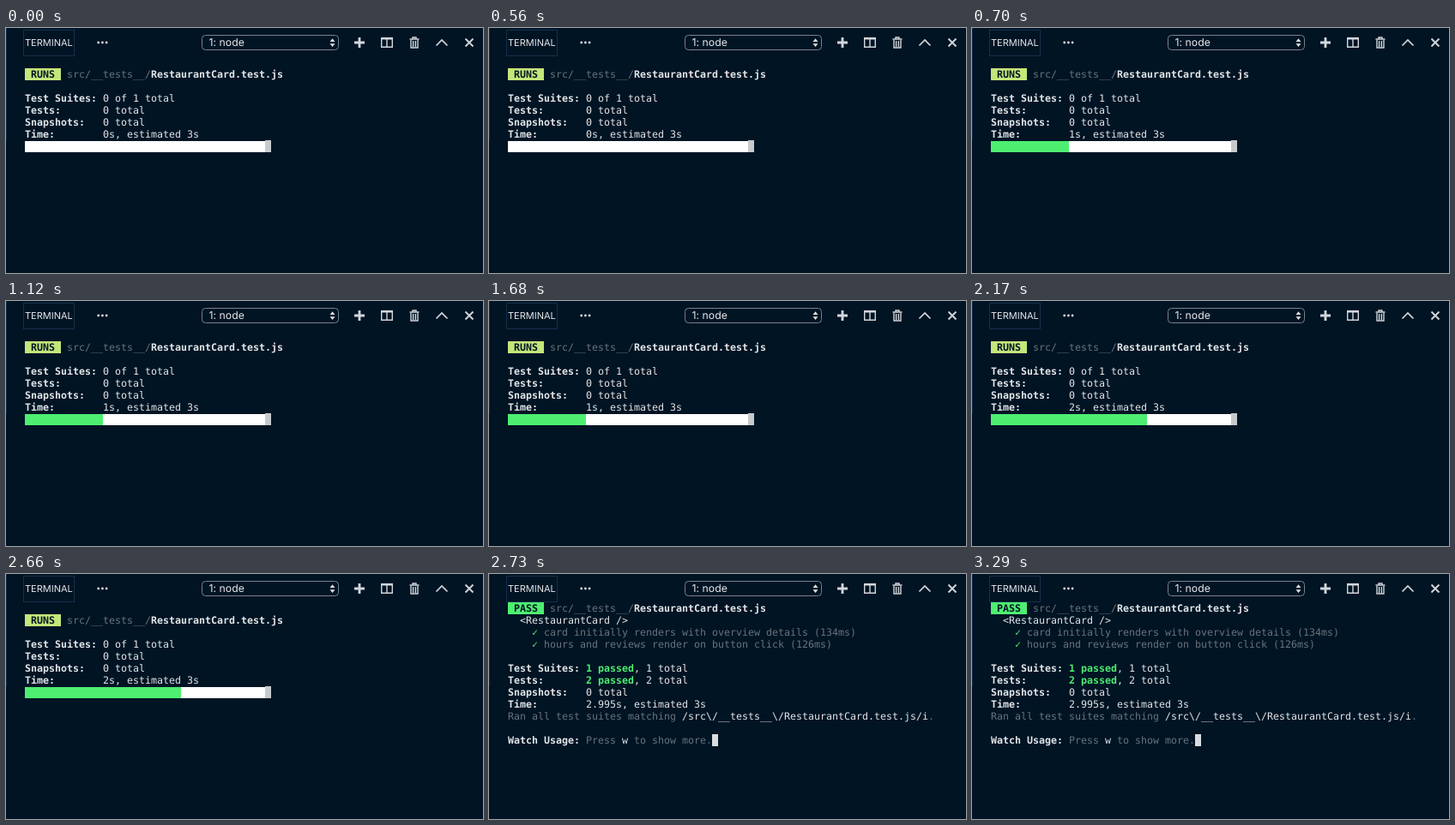
Animation, 556 px wide and 286 px high, one loop 4.34 s. Source, as an HTML page:

```html
<!DOCTYPE html>
<html lang="en">
<head>
<meta charset="utf-8">
<title>Test run</title>
<style>
  html, body { margin: 0; width: 100%; height: 100%; overflow: hidden; background: #011424; }
  svg { display: block; width: 100%; height: 100%; }
  text { white-space: pre; text-rendering: geometricPrecision; }
  .ui { font-family: Inter, sans-serif; fill: #e4e7ea; }
  .term { font: 11.63px "DejaVu Sans Mono", monospace; }
</style>
</head>
<body>
<svg id="stage" viewBox="0 0 556 286">
  <rect width="556" height="286" fill="#011424"/>
  <rect width="1" height="131" fill="#0b2d4c"/>

  <rect x="20.5" y="2.5" width="59" height="30" fill="none" stroke="#152f4b"/>
  <text class="ui" x="22" y="21" font-size="11">TERMINAL</text>
  <g fill="#d5dade">
    <circle cx="107.7" cy="17" r="1.4"/>
    <circle cx="112.4" cy="17" r="1.4"/>
    <circle cx="117.1" cy="17" r="1.4"/>
  </g>

  <rect x="228.5" y="8.5" width="159" height="17" rx="4" fill="#011424" stroke="#75838f"/>
  <text class="ui" x="236.5" y="21.2" font-size="12.3">1: node</text>
  <path d="M377.5 16 L380.5 12.2 L383.5 16Z M377.5 18.2 L380.5 22 L383.5 18.2Z" fill="#dde1e4"/>

  <g fill="none" stroke="#d2d6da">
    <path d="M406 17H418M412 11V23" stroke-width="2.8"/>
    <path d="M437.7 12V22.3H450.3V12M444 12V22" stroke-width="1.4"/>
    <path d="M437 12.2H451" stroke-width="2.6"/>
    <path d="M470.5 13H481.5M474 12.5V11H478V12.5" stroke-width="1.4"/>
    <path d="M472 14V23H480V14M474.6 15V22M477.4 15V22" stroke-width="1.4"/>
    <path d="M501.5 20.5L508 14L514.5 20.5" stroke-width="1.7"/>
    <path d="M535.5 12.5L544.5 21.5M544.5 12.5L535.5 21.5" stroke-width="1.9"/>
  </g>

  <g id="running" class="term"></g>
  <g id="passed" class="term"></g>
</svg>
<script>
const LOOP = 4340, TICKS = [700, 1750], DONE = 2730;
const LEFT = 22, CELL = 7, LINE = 14;
const WHITE = '#e3e6e8', GREY = '#68737c', GREEN = '#4eee71', LIME = '#c4e67a', DARK = '#011424';

const running = document.getElementById('running');
const passed = document.getElementById('passed');

function add(parent, tag, attrs, content = '') {
  const el = document.createElementNS('http://www.w3.org/2000/svg', tag);
  for (const key in attrs) el.setAttribute(key, attrs[key]);
  el.textContent = content;
  parent.appendChild(el);
  return el;
}

function print(parent, row, col, content, fill = WHITE, bold = false) {
  return add(parent, 'text', {
    x: LEFT + col * CELL, y: 44 + row * LINE, fill,
    'font-weight': bold ? 700 : 400
  }, content);
}

function block(parent, x, y, width, height, fill) {
  return add(parent, 'rect', { x, y, width, height, fill });
}

function header(parent, row, label, color) {
  block(parent, LEFT, 33 + row * LINE, 6 * CELL, LINE, color);
  print(parent, row, 1, label, DARK, true);
  print(parent, row, 7, 'src/__tests__/', GREY);
  print(parent, row, 21, 'RestaurantCard.test.js', WHITE, true);
}

function labels(parent, row) {
  ['Test Suites:', 'Tests:', 'Snapshots:', 'Time:'].forEach((label, i) =>
    print(parent, row + i, 0, label, WHITE, true));
}

header(running, 1, 'RUNS', LIME);
labels(running, 3);
print(running, 3, 13, '0 of 1 total');
print(running, 4, 13, '0 total');
print(running, 5, 13, '0 total');
const clock = print(running, 6, 13, '');
block(running, LEFT, 132, 40 * CELL, 13, '#ffffff');
const bar = block(running, LEFT, 132, 0, 13, GREEN);
block(running, LEFT + 40 * CELL, 131, CELL, 14, '#c6cacd');

header(passed, 0, 'PASS', GREEN);
print(passed, 1, 2, '<RestaurantCard />');
['card initially renders with overview details (134ms)',
 'hours and reviews render on button click (126ms)'].forEach((name, i) => {
  print(passed, 2 + i, 4, '✓', GREEN);
  print(passed, 2 + i, 6, name, GREY);
});
labels(passed, 5);
[1, 2].forEach((n, i) => {
  print(passed, 5 + i, 13, n + ' passed', GREEN, true);
  print(passed, 5 + i, 21, `, ${n} total`);
});
print(passed, 7, 13, '0 total');
print(passed, 8, 13, '2.995s, estimated 3s');
print(passed, 9, 0, 'Ran all test suites matching ', GREY);
print(passed, 9, 29, '/src\\/__tests__\\/RestaurantCard.test.js/i');
print(passed, 9, 70, '.', GREY);
print(passed, 11, 0, 'Watch Usage:', WHITE, true);
print(passed, 11, 13, 'Press ', GREY);
print(passed, 11, 19, 'w');
print(passed, 11, 20, ' to show more.', GREY);
block(passed, LEFT + 34 * CELL, 187, CELL, LINE, '#d9dcde');

function render(t) {
  const done = t >= DONE;
  const seconds = TICKS.filter(tick => t >= tick).length;
  running.setAttribute('visibility', done ? 'hidden' : 'visible');
  passed.setAttribute('visibility', done ? 'visible' : 'hidden');
  clock.textContent = `${seconds}s, estimated 3s`;
  bar.setAttribute('width', seconds * 13 * CELL);
}

const start = performance.now();
function frame() {
  render((performance.now() - start) % LOOP);
  requestAnimationFrame(frame);
}
render(0);
requestAnimationFrame(frame);
</script>
</body>
</html>
```
